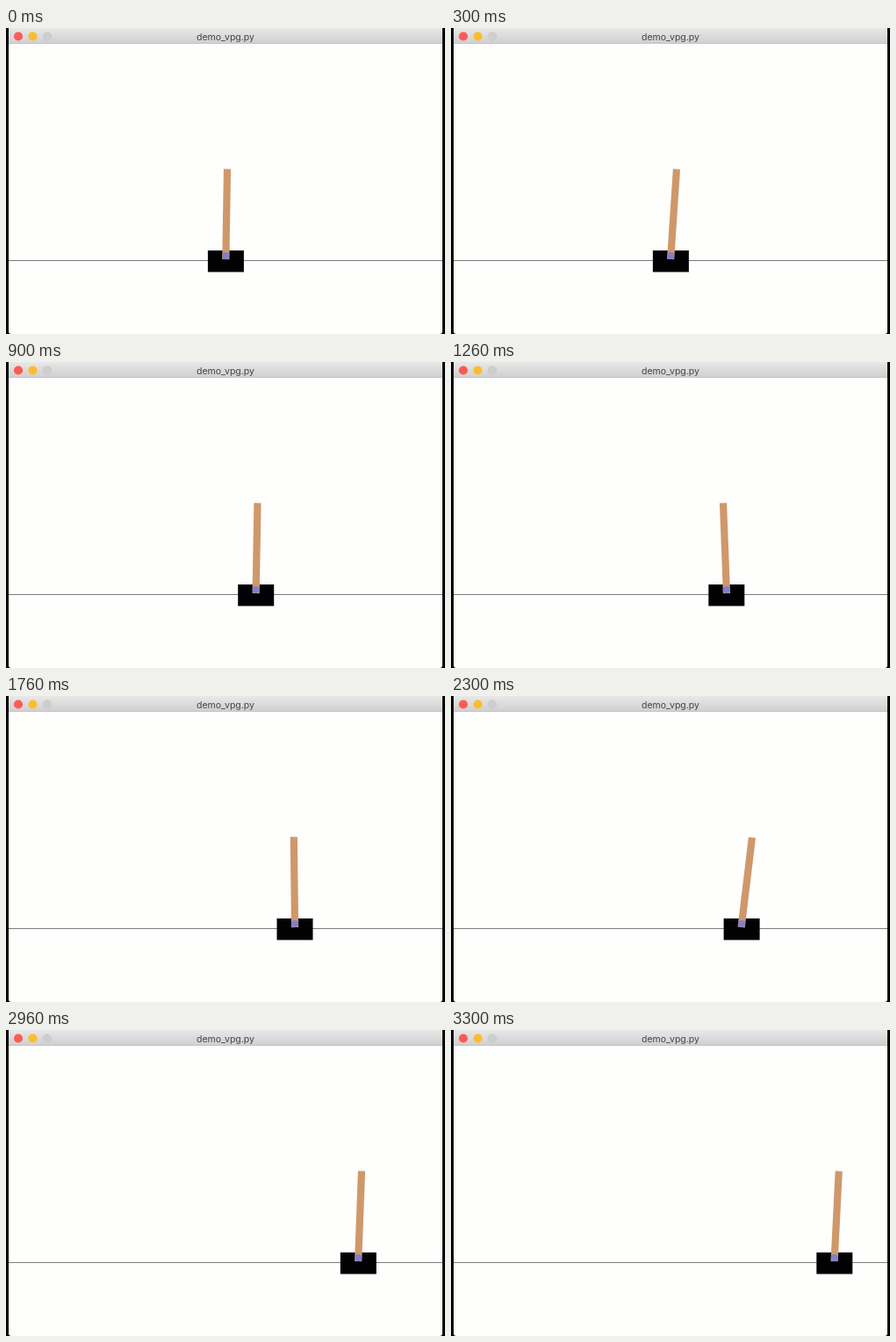
An HTML page for the animation above (3460 ms loop, 500 px wide and 348 px high).

```html
<!DOCTYPE html>
<html lang="en">
<head>
<meta charset="utf-8">
<title>demo_vpg.py</title>
<style>
html, body { margin: 0; width: 100%; height: 100%; overflow: hidden; background: #000; }
svg { display: block; width: 500px; height: 348px; }
text { font: 10.5px Inter, Roboto, sans-serif; fill: #444; text-anchor: middle; }
</style>
</head>
<body>
<svg viewBox="0 0 500 348">
  <defs>
    <linearGradient id="bar" x2="0" y2="1">
      <stop offset="0" stop-color="#e8e8e8"/>
      <stop offset="1" stop-color="#d0d0d0"/>
    </linearGradient>
  </defs>
  <rect width="500" height="348"/>
  <path d="M3 0H497V345Q497 348 494 348H6Q3 348 3 345Z" fill="#fefefd"/>
  <rect x="3" width="494" height="17" fill="url(#bar)"/>
  <rect x="3" y="17" width="494" height="1" fill="#c4c4c4"/>
  <circle cx="14" cy="9.5" r="5.1" fill="#fc5b57"/>
  <circle cx="30.5" cy="9.5" r="5.1" fill="#fdbc2e"/>
  <circle cx="47" cy="9.5" r="4.8" fill="#cecece" stroke="#c2c2c2" stroke-width=".5"/>
  <text x="250" y="13.8">demo_vpg.py</text>
  <path d="M3 264.5H497" stroke="#7d7d7d"/>
  <g id="cart">
    <rect x="-20.5" y="253" width="41" height="24.5" fill="#020205"/>
    <g id="pole">
      <rect x="-4.1" y="160.3" width="8.2" height="102.8" fill="#cf986a"/>
      <circle cy="259" r="4.1" fill="#8080cc"/>
    </g>
  </g>
</svg>
<script>
const LOOP = 3460, STEP = 100 / 3, LAST = 99, PIVOT = 259, LENGTH = 98.7;

// turning points: step, cart centre, sideways lean of the pole tip
const keys = [
  [0, 250.4, 1.6], [5, 248.1, 5.9], [17, 259.9, 5.8], [38, 313.8, -3.8],
  [49, 332.8, -10], [53, 329, -1.2], [63, 324, 14], [69, 331.1, 11.8],
  [80, 370.3, 0], [89, 401.3, 3.7], [99, 436.8, 4.9]
];

function slope(i, c) {
  const a = keys[Math.max(i - 1, 0)], b = keys[Math.min(i + 1, keys.length - 1)];
  return (b[c] - a[c]) / (b[0] - a[0]);
}

// cubic Hermite curve through one column of keys
function curve(n, c) {
  let i = 0;
  while (i < keys.length - 2 && n >= keys[i + 1][0]) i++;
  const a = keys[i], b = keys[i + 1], w = b[0] - a[0];
  const u = (n - a[0]) / w, v = 1 - u;
  return v * v * (1 + 2 * u) * a[c] + u * u * (3 - 2 * u) * b[c]
    + w * u * v * (v * slope(i, c) - u * slope(i + 1, c));
}

const cart = document.getElementById("cart");
const pole = document.getElementById("pole");

function draw(time) {
  const n = Math.min(LAST, Math.floor((time % LOOP + 7) / STEP));
  const angle = Math.asin(curve(n, 2) / LENGTH) * 180 / Math.PI;
  cart.setAttribute("transform", `translate(${curve(n, 1).toFixed(2)})`);
  pole.setAttribute("transform", `rotate(${angle.toFixed(2)} 0 ${PIVOT})`);
}

const start = performance.now();
function tick() {
  draw(performance.now() - start);
  requestAnimationFrame(tick);
}
draw(0);
requestAnimationFrame(tick);
</script>
</body>
</html>
```
